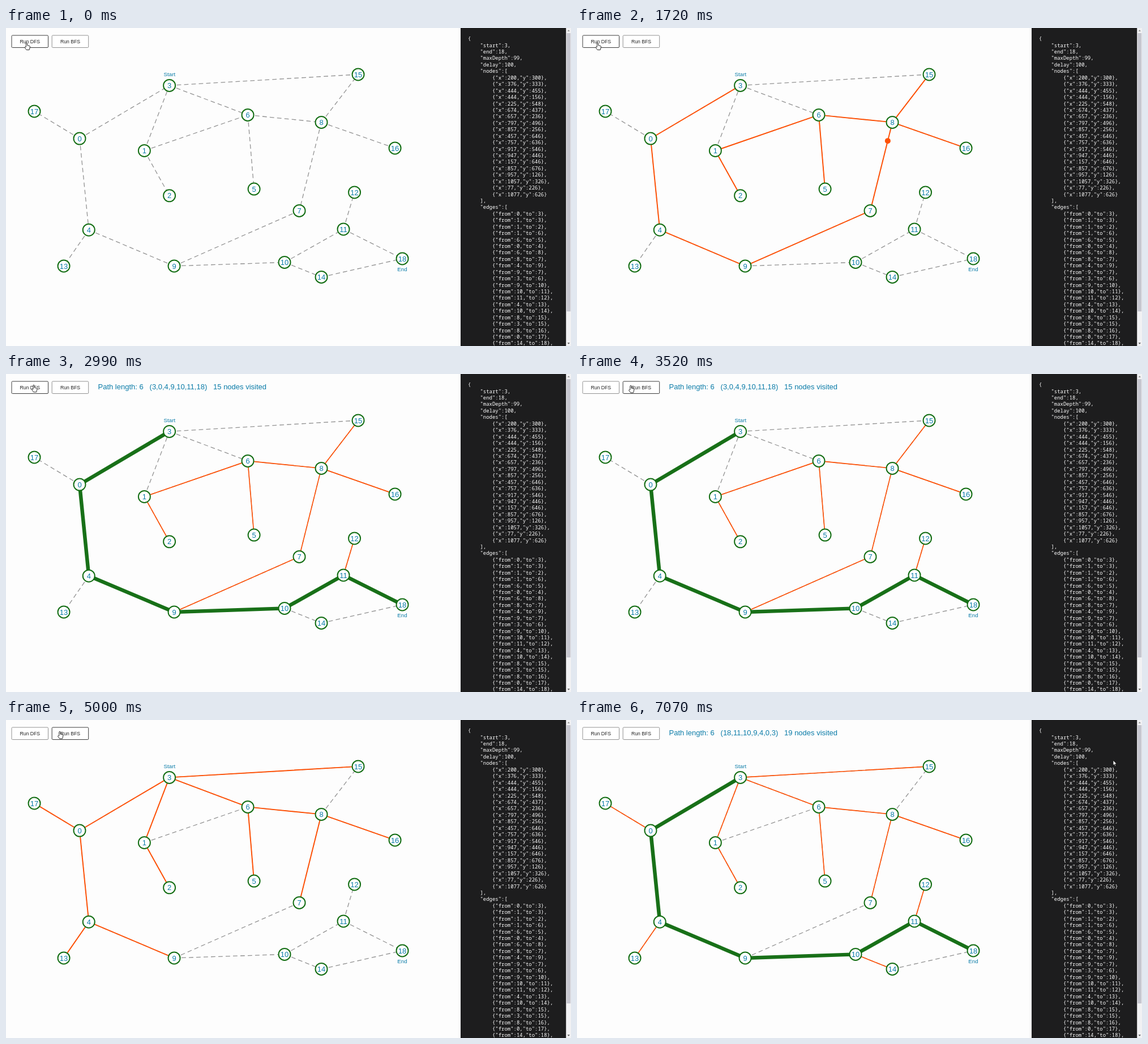
These frames come from a looping animation (998x561 px, 7150 ms). An HTML page:

```html
<!DOCTYPE html>
<html lang="en">
<head>
<meta charset="utf-8">
<title>Graph search</title>
<style>
  html, body { margin: 0; width: 100%; height: 100%; overflow: hidden; background: #fdfdfd; }
  svg { display: block; width: 100vw; height: 100vh; }
  text { font-family: "Liberation Sans", Arial, sans-serif; }
  .edge { stroke: #929292; stroke-width: 1.3; stroke-dasharray: 7.8 5.2; }
  .node { fill: #fff; stroke: #146e14; stroke-width: 2; }
  .blue { fill: #0b7ca8; text-anchor: middle; }
  .button { fill: #fff; stroke-width: 1; }
  .caption { fill: #222; font-size: 8.67px; text-anchor: middle; }
  .code { fill: #fff; font: 500 8.95px "Noto Sans Mono", "DejaVu Sans Mono", monospace; }
  .cursor { fill: #fff; stroke: #111; stroke-width: .9; stroke-linejoin: round; }
</style>
</head>
<body>
<svg id="stage" viewBox="0 0 998 561"></svg>
<script>
const LOOP = 7150, START = 3, END = 18, SCALE = 0.65;
const ORANGE = '#ff5106', GREEN = '#187018';

const points = [
  [200, 300], [376, 333], [444, 455], [444, 156], [225, 548], [674, 437], [657, 236],
  [797, 496], [857, 256], [457, 646], [757, 636], [917, 546], [947, 446], [157, 646],
  [857, 676], [957, 126], [1057, 326], [77, 226], [1077, 626]
];
const edges = [
  [0, 3], [1, 3], [1, 2], [1, 6], [6, 5], [0, 4], [6, 8], [8, 7], [4, 9], [9, 7], [3, 6],
  [9, 10], [10, 11], [11, 12], [4, 13], [10, 14], [8, 15], [3, 15], [8, 16], [0, 17],
  [14, 18], [11, 18]
];
const nodes = points.map(p => p.map(v => v * SCALE));
const links = nodes.map((_, n) =>
  edges.filter(e => e.includes(n)).map(([a, b]) => a === n ? b : a));

const stage = document.getElementById('stage');
function add(tag, attrs, parent = stage) {
  const el = document.createElementNS('http://www.w3.org/2000/svg', tag);
  set(el, attrs);
  parent.append(el);
  return el;
}
function set(el, attrs) {
  for (const key in attrs) el.setAttribute(key, attrs[key]);
}
function label(str, x, y, attrs) {
  const el = add('text', { x, y, ...attrs });
  el.textContent = str;
  return el;
}
const show = (el, on) => el.setAttribute('visibility', on ? 'visible' : 'hidden');
const clamp = v => Math.max(0, Math.min(1, v));
const mix = (a, b, k) => a + (b - a) * k;
const between = (a, b, k) => [mix(nodes[a][0], nodes[b][0], k), mix(nodes[a][1], nodes[b][1], k)];

// Each search returns the moves of the ball: [from, to, isReturn]
function depthFirst() {
  const moves = [], seen = new Set([START]);
  function visit(n) {
    if (n === END) return true;
    for (const next of links[n]) {
      if (seen.has(next)) continue;
      seen.add(next);
      moves.push([n, next, false]);
      if (visit(next)) return true;
      moves.push([next, n, true]);
    }
    return false;
  }
  visit(START);
  return moves;
}
function breadthFirst() {
  const moves = [], seen = new Set([START]), queue = [START];
  while (queue.length) {
    const n = queue.shift();
    for (const next of links[n]) {
      if (seen.has(next)) continue;
      seen.add(next);
      queue.push(next);
      moves.push([n, next, false]);
      if (next === END) return moves;
    }
  }
  return moves;
}
function route(moves) {
  const path = [END];
  while (path[0] !== START) {
    path.unshift(moves.find(m => !m[2] && m[1] === path[0])[0]);
  }
  return path;
}
function makeRun(begin, step, moves, result) {
  const path = route(moves);
  return { begin, step, moves, path, result, end: begin + step * moves.length };
}
const GAP = '\u00a0'.repeat(3);
const summary = (list, count) => `Path length: 6${GAP}(${list})${GAP}${count} nodes visited`;
const runs = [
  makeRun(0, 100, depthFirst(), summary('3,0,4,9,10,11,18', 15)),
  makeRun(3711, 99.4, breadthFirst(), summary('18,11,10,9,4,0,3', 19))
];

// Graph
add('rect', { width: 998, height: 561, fill: '#fdfdfd' });
for (const [a, b] of edges) {
  add('line', { class: 'edge', x1: nodes[a][0], y1: nodes[a][1], x2: nodes[b][0], y2: nodes[b][1] });
}
const trail = add('path', { fill: 'none', stroke: ORANGE });
const found = add('path', { fill: 'none' });
const ball = add('circle', { r: 5, fill: ORANGE });
nodes.forEach(([x, y], n) => {
  add('circle', { class: 'node', cx: x, cy: y, r: 10.5 });
  label(n, x, y + 4.6, { class: 'blue', 'font-size': 13 });
});
label('Start', nodes[START][0] + .3, 85.3, { class: 'blue', 'font-size': 9.75 });
label('End', nodes[END][0], 429.4, { class: 'blue', 'font-size': 9.75 });
const report = label('', 162.5, 27.4, { fill: '#0b7ca8', 'font-size': 13 });

// Buttons
const buttons = [['Run DFS', 10], ['Run BFS', 81.2]].map(([name, x]) => {
  const box = add('rect', { class: 'button', x, y: 13, width: 64.5, height: 21.5, rx: 1.5 });
  label(name, x + 32.3, 26.7, { class: 'caption' });
  return { box, x };
});

// Code panel
add('rect', { x: 803, width: 187, height: 561, fill: '#1d1d1e' });
const list = (items, names) => items.map(([a, b], i) =>
  [2, `{"${names[0]}":${a},"${names[1]}":${b}}${i < items.length - 1 ? ',' : ''}`]);
const rows = [
  [0, '{'], [1, '"start":3,'], [1, '"end":18,'], [1, '"maxDepth":99,'], [1, '"delay":100,'],
  [1, '"nodes":['], ...list(points, ['x', 'y']), [1, '],'],
  [1, '"edges":['], ...list(edges, ['from', 'to'])
];
rows.forEach(([depth, str], i) =>
  label(str, 816 + depth * 21.5, 22.2 + i * 11.43, { class: 'code' }));

// Scrollbar
add('rect', { x: 989.2, width: 9, height: 561, fill: '#f1f1f3' });
add('rect', { x: 990.4, y: 9, width: 6.8, height: 491, fill: '#c6c6cf' });
add('path', { d: 'M991.6 5.8h4.4l-2.2-2.6z', fill: '#8a8a8a' });
add('path', { d: 'M991.6 555.2h4.4l-2.2 2.6z', fill: '#505050' });

// Mouse pointer
const hand = add('path', { class: 'cursor',
  d: 'M-1.2 7.6V1.1a1.1 1.1 0 0 1 2.2 0V4.6l3.8.8q1.2.3 1.1 1.6L5.3 10 4.6 12.6H-.4L-3.6 8.2q.6-1.4 2.4-.6z' });
const arrow = add('path', { class: 'cursor', d: 'M0 0V9.2L2.1 7.3 3.5 10.4 5 9.8 3.6 6.7H6.5z' });
const pointer = [
  [0, 36.5, 26], [2880, 36.5, 26], [2990, 49, 19.3], [3520, 95, 20.3],
  [6190, 95, 20.3], [6900, 946, 58], [7060, 947, 71], [LOOP, 947, 71]
];

function drawPointer(t) {
  const i = pointer.findIndex(p => p[0] > t);
  const [t0, x0, y0] = pointer[i - 1], [t1, x1, y1] = pointer[i];
  let k = (t - t0) / (t1 - t0);
  if (x1 - x0 > 100) k = k * k * (3 - 2 * k);
  const x = mix(x0, x1, k), y = mix(y0, y1, k);
  let over = false;
  for (const { box, x: left } of buttons) {
    const hover = x >= left && x <= left + 64.5 && y >= 13 && y <= 34.5;
    box.setAttribute('stroke', hover ? '#3c3c3c' : '#929292');
    over = over || hover;
  }
  for (const el of [hand, arrow]) el.setAttribute('transform', `translate(${x} ${y})`);
  show(hand, over);
  show(arrow, !over);
}

function drawRun(t) {
  const run = t < runs[1].begin ? runs[0] : runs[1];
  const progress = (t - run.begin) / run.step;
  const index = Math.min(run.moves.length - 1, Math.floor(progress));
  const part = clamp(progress - index);
  const done = t >= run.end;
  const fade = clamp((t - run.end) / 100);

  const lines = run.moves.slice(0, index + 1).map(([a, b, back], i) =>
    back ? '' : `M${nodes[a]}L${between(a, b, i < index ? 1 : part)}`);
  set(trail, { d: lines.join(''), 'stroke-width': mix(1.95, 1.65, fade) });

  const [from, to] = run.moves[index];
  const [cx, cy] = between(from, to, part);
  set(ball, { cx, cy });
  show(ball, !done);

  set(found, {
    d: 'M' + run.path.map(n => nodes[n]).join('L'),
    stroke: GREEN,
    'stroke-width': mix(1.95, 6.5, fade)
  });
  show(found, done);
  report.textContent = done ? run.result : '';
}

function frame() {
  const t = performance.now() % LOOP;
  drawRun(t);
  drawPointer(t);
  requestAnimationFrame(frame);
}
frame();
</script>
</body>
</html>
```
